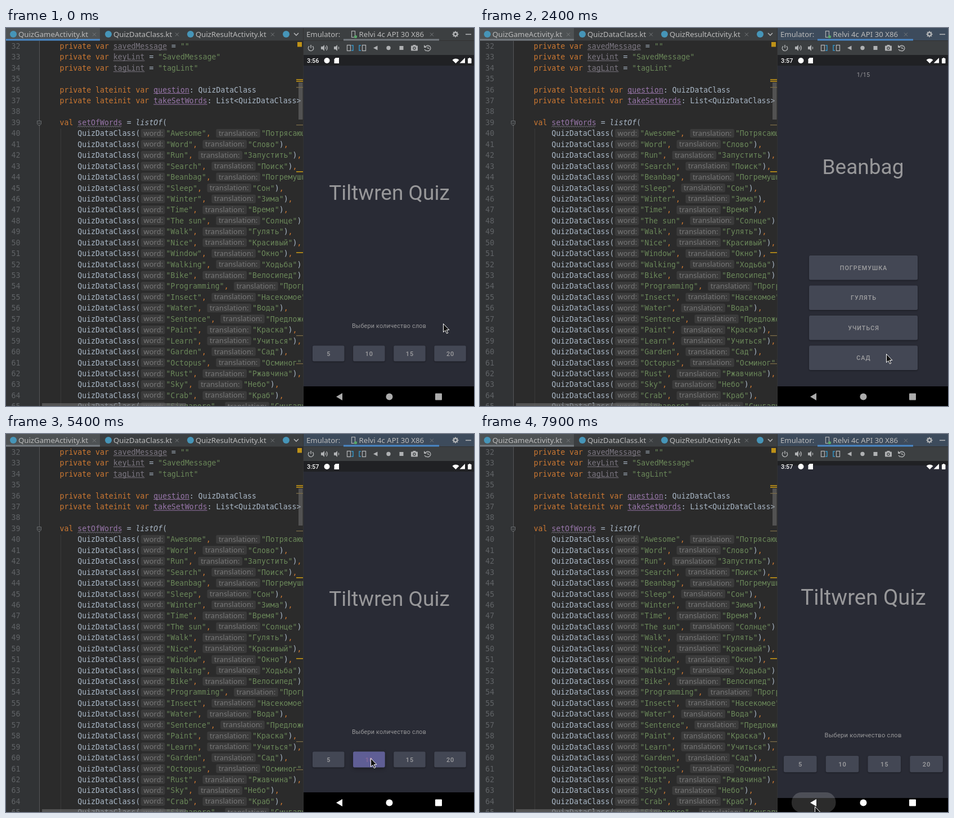
Animation of 832 by 673 pixels, one loop 8000 ms. Source, as an HTML page with a canvas:

```html
<!DOCTYPE html>
<html lang="en">
<head>
<meta charset="utf-8">
<title>Quiz demo</title>
<style>
html, body { margin: 0; width: 100%; height: 100%; overflow: hidden; background: #2b2b2b; }
canvas { display: block; width: 832px; height: 673px; }
</style>
</head>
<body>
<canvas id="stage" width="832" height="673"></canvas>
<script>
const W = 832, H = 673, LOOP = 8000, STEP = 100;
const PHONE = { x: 529, y: 48, cx: 681, cy: 360.5 };
const MONO = '13.2px "DejaVu Sans Mono", monospace';
const UI = '13.2px "Noto Sans", sans-serif';
const HINT = '13px "Noto Sans", sans-serif';
const ROBOTO = 'Roboto, sans-serif';
const CHAR = 7.945, LINE = 19.44, CODE_X = 95.5;
const INK = { text: '#a9b7c6', key: '#cc7832', str: '#6a8759', prop: '#9876aa', unused: '#7c7782' };

const words = ('Awesome=Потрясающе|Word=Слово|Run=Запустить|Search=Поиск|Beanbag=Погремушка|Sleep=Сон|' +
  'Winter=Зима|Time=Время|The sun=Солнце|Walk=Гулять|Nice=Красивый|Window=Окно|Walking=Ходьба|' +
  'Bike=Велосипед|Programming=Программирование|Insect=Насекомое|Water=Вода|Sentence=Предложение|' +
  'Paint=Краска|Learn=Учиться|Garden=Сад|Octopus=Осминог|Rust=Ржавчина|Sky=Небо|Crab=Краб|' +
  'Singapore=Сингапур').split('|').map(pair => pair.split('='));

const games = {
  fifteen: { count: '1/15', word: 'Beanbag', answers: ['ПОГРЕМУШКА', 'ГУЛЯТЬ', 'УЧИТЬСЯ', 'САД'] },
  ten: { count: '1/10', word: 'Car', answers: ['МАШИНА', 'ВРЕМЯ', 'НЕБО', 'ПРЕДЛОЖЕНИЕ'] }
};
const transitions = [
  { at: 2080, kind: 'open', from: 'home', to: 'fifteen' },
  { at: 4480, kind: 'close', from: 'fifteen', to: 'home' },
  { at: 6080, kind: 'open', from: 'home', to: 'ten' },
  { at: 7815, kind: 'close', from: 'ten', to: 'home' }
];
const presses = [{ button: 2, from: 1300, to: 1900 }, { button: 1, from: 5300, to: 5900, fade: 100 }];
const pointer = [
  [0, 777, 526], [500, 777, 526], [1000, 722, 580], [3300, 722, 580], [3700, 592, 649],
  [4600, 592, 649], [5000, 643, 583], [5100, 648, 577], [6400, 648, 577], [6900, 625, 616],
  [7100, 612, 640], [7200, 612, 640], [7600, 595, 663], [8000, 595, 663]
];

const ctx = document.getElementById('stage').getContext('2d');
const clamp = v => Math.max(0, Math.min(1, v));
const mix = (a, b, p) => a + (b - a) * p;

function rect(x, y, w, h, color, r = 0) {
  ctx.fillStyle = color;
  ctx.beginPath();
  ctx.roundRect(x, y, w, h, r);
  ctx.fill();
}
function circle(x, y, r, color) {
  ctx.fillStyle = color;
  ctx.beginPath();
  ctx.arc(x, y, r, 0, Math.PI * 2);
  ctx.fill();
}
function trace(points, close) {
  ctx.beginPath();
  points.forEach(([x, y]) => ctx.lineTo(x, y));
  if (close) ctx.closePath();
}
function poly(points, color) {
  trace(points, true);
  ctx.fillStyle = color;
  ctx.fill();
}
function line(points, color, width = 1) {
  trace(points);
  ctx.strokeStyle = color;
  ctx.lineWidth = width;
  ctx.stroke();
}
function arc(x, y, r, from, to, color, width = 1.3) {
  ctx.beginPath();
  ctx.arc(x, y, r, from, to);
  ctx.strokeStyle = color;
  ctx.lineWidth = width;
  ctx.stroke();
}
function text(s, x, y, font, color, align = 'left', spacing = 0) {
  ctx.font = font;
  ctx.fillStyle = color;
  ctx.textAlign = align;
  ctx.letterSpacing = spacing + 'px';
  ctx.fillText(s, x, y);
  ctx.letterSpacing = '0px';
}
function cross(x, y) {
  line([[x - 3, y - 3], [x + 3, y + 3]], '#777a7c');
  line([[x - 3, y + 3], [x + 3, y - 3]], '#777a7c');
}

// Editor

function codeRun(parts, x, y) {
  for (const [s, color, style] of parts) {
    const end = x + s.length * CHAR;
    text(s, x, y, (style === 'italic' ? 'italic ' : '') + MONO, INK[color]);
    if (style === 'under') rect(x, y + 1.5, end - x, 1, INK[color]);
    if (style === 'wave') {
      const wave = [];
      for (let i = 0; x + i * 2 <= end; i++) wave.push([x + i * 2, y + (i % 2 ? 1.5 : 3.5)]);
      line(wave, '#8b8496', 0.9);
    }
    x = end;
  }
  return x;
}
function hint(label, x, y, advance) {
  rect(x + 1.5, y - 12.5, advance - 3.5, 15.5, '#3b3b3b', 3);
  text(label, x + 6, y - 0.5, HINT, '#787878');
  return x + advance;
}
function drawCode() {
  const baseline = n => 36.8 + (n - 32) * LINE;
  const declare = (n, keyword, name, color, rest) =>
    codeRun([[keyword + ' ', 'key'], [name, color, 'under'], ...rest], CODE_X, baseline(n));

  rect(0, 23, 529, 650, '#2b2b2b');
  rect(0, 23, 59, 650, '#313335');
  rect(59, 23, 1, 650, '#555759');
  rect(97, 179, 1, 494, '#3a3a3a');
  for (let n = 32; n <= 65; n++) text(n, 9.5, baseline(n), MONO, '#606366');

  declare(32, 'private var', 'savedMessage', 'unused', [[' = ', 'text'], ['""', 'str']]);
  declare(33, 'private var', 'keyLint', 'unused', [[' = ', 'text'], ['"SavedMessage"', 'str']]);
  declare(34, 'private var', 'tagLint', 'unused', [[' = ', 'text'], ['"tagLint"', 'str']]);
  declare(36, 'private lateinit var', 'question', 'prop', [[': QuizDataClass', 'text']]);
  declare(37, 'private lateinit var', 'takeSetWords', 'prop', [[': List<QuizDataClass>', 'text']]);
  codeRun([['val ', 'key'], ['setOfWords', 'prop', 'wave'], [' = ', 'text'],
    ['listOf', 'text', 'italic'], ['(', 'text']], CODE_X, baseline(39));

  words.forEach(([word, translation], i) => {
    const y = baseline(40 + i);
    let x = codeRun([['QuizDataClass(', 'text']], CODE_X + 4 * CHAR, y);
    x = hint('word:', x, y, 46);
    x = codeRun([[`"${word}"`, 'str'], [', ', 'key']], x, y);
    x = hint('translation:', x, y, 82);
    codeRun([[`"${translation}"`, 'str'], [')', 'text'], [',', 'key']], x, y);
  });

  rect(55, 165, 8, 7, '#313335');
  line([[55.5, 165.5], [62.5, 165.5], [62.5, 171], [59, 174], [55.5, 171], [55.5, 165.5]], '#6b6e70');
  line([[57, 169.5], [61, 169.5]], '#6b6e70');

  rect(520, 97, 7.5, 66, 'rgba(130,130,130,.45)');
  rect(518, 25, 8, 8.5, '#be9117');
  for (const y of [91, 94, 255, 399]) rect(516, y, 12, 1.7, '#be9117');
  for (const y of [105, 172, 547, 597]) rect(516, y, 12, 1.3, '#7b6b48');
  rect(64, 668, 256, 5, 'rgba(110,110,110,.6)');
}
function underline(x, w, focused) {
  rect(x, 19.5, w, 3, focused ? '#4a88c7' : '#747a80');
}
function drawTabs(focused) {
  rect(0, 0, 529, 23, '#3c3f41');
  rect(0, 22, 529, 1, '#323232');
  rect(0, 0, 167, 22, '#4e5254');
  underline(0, 167, focused);
  const tabs = [[13, 'QuizGameActivity.kt', 157], [182, 'QuizDataClass.kt', 304], [328, 'QuizResultActivity.kt', 474]];
  for (const [x, name, closeX] of tabs) {
    circle(x, 11, 6, '#4695b8');
    text(name, x + 9, 16, UI, '#bbbbbb');
    cross(closeX, 11.5);
  }
  circle(498, 11, 6, '#4695b8');
  line([[512, 9], [516, 13], [520, 9]], '#afb1b3', 1.6);
}

// Emulator panel

function speaker(x, waves) {
  poly([[x - 6, 33], [x - 3, 33], [x, 30], [x, 41], [x - 3, 38], [x - 6, 38]], '#afb1b3');
  for (let i = 1; i <= waves; i++) arc(x, 35.5, i * 2.7, -0.9, 0.9, '#afb1b3');
}
function rotateIcon(x, side) {
  ctx.strokeStyle = '#afb1b3';
  ctx.lineWidth = 1.3;
  ctx.strokeRect(x - 2.5 - side * 2, 30.5, 6, 10);
  line([[x + side * 3, 31], [x + side * 6, 31], [x + side * 6, 40], [x + side * 3, 40]], '#3592c4', 1.5);
}
function drawPanel(focused) {
  rect(528, 0, 1, H, '#323232');
  rect(529, 0, 303, 22, focused ? '#3d4b5c' : '#3c3f41');
  rect(529, 22, 303, 1, '#323232');
  underline(600, 170, focused);
  text('Emulator:', 534, 16, UI, '#bbbbbb');
  ctx.strokeStyle = '#afb1b3';
  ctx.lineWidth = 1.2;
  ctx.strokeRect(614.5, 5.5, 6, 11);
  circle(621.5, 15.5, 2.6, '#59a869');
  text('Relvi 4c API 30 X86', 627.5, 16, UI, '#bbbbbb');
  cross(757, 11.5);
  arc(799, 11, 3.2, 0, 7, '#afb1b3', 2.4);
  for (let i = 0; i < 8; i++) {
    const c = Math.cos(i * Math.PI / 4), s = Math.sin(i * Math.PI / 4);
    line([[799 + c * 3.5, 11 + s * 3.5], [799 + c * 5.6, 11 + s * 5.6]], '#afb1b3', 1.8);
  }
  rect(817, 10.5, 10, 1.6, '#afb1b3');

  rect(529, 23, 303, 25, '#3c3f41');
  arc(542, 36, 4.6, -0.9, Math.PI + 0.9, '#afb1b3', 1.5);
  rect(541.3, 30, 1.5, 5.5, '#afb1b3');
  speaker(566, 2);
  speaker(589, 1);
  rotateIcon(611, 1);
  rotateIcon(634, -1);
  poly([[653, 35.5], [660.5, 31.5], [660.5, 39.5]], '#afb1b3');
  circle(680, 35.5, 3.7, '#afb1b3');
  rect(699.5, 32, 7, 7, '#afb1b3');
  rect(720, 31.5, 12, 9, '#afb1b3', 1);
  rect(723.5, 30, 5, 2, '#afb1b3');
  circle(726, 36, 2.7, '#3c3f41');
  circle(726, 36, 1.5, '#afb1b3');
  arc(750, 36, 4.8, -2.6, 2.2, '#afb1b3', 1.5);
  poly([[743, 30], [743, 35], [748, 35]], '#afb1b3');
  line([[750, 33], [750, 36.5], [753, 36.5]], '#afb1b3', 1.2);
  line([[744, 38], [747, 41]], '#afb1b3', 1.3);
}

// Phone

const homeButtonX = i => 545 + i * 72.1;

function button(x, y, w, h, label, pressed = 0) {
  ctx.save();
  ctx.shadowColor = 'rgba(0,0,0,.4)';
  ctx.shadowBlur = 2.5 + pressed * 4;
  ctx.shadowOffsetY = 1 + pressed;
  rect(x, y, w, h, '#434754', 2.5);
  ctx.restore();
  if (pressed) {
    ctx.save();
    ctx.globalAlpha *= pressed;
    rect(x, y, w, h, '#5f5e95', 2.5);
    ctx.restore();
  }
  text(label, x + w / 2 + 0.5, y + h / 2 + 4, `500 10.8px ${ROBOTO}`, pressed ? '#8c6b9b' : '#a0a0a2', 'center', 0.96);
}
function pressLevel(i, t) {
  const press = presses.find(p => p.button === i && t >= p.from && t < p.to);
  if (!press) return 0;
  return t === press.from || (press.fade && t >= press.to - press.fade) ? 0.5 : 1;
}
function drawApp(name, t, scale = 1, alpha = 1) {
  const game = games[name];
  ctx.save();
  ctx.globalAlpha = alpha;
  ctx.translate(PHONE.cx, PHONE.cy);
  ctx.scale(scale, scale);
  ctx.translate(-PHONE.cx, -PHONE.cy);
  rect(529, 67, 303, 571, '#292b35');
  rect(529, 48, 303, 19, '#202124');
  rect(529, 638, 303, 35, '#000');
  const small = `10.8px ${ROBOTO}`, big = `37px ${ROBOTO}`, gray = '#98989a';
  if (game) {
    text(game.count, 681.5, 87, small, gray, 'center', 0.2);
    text(game.word, 681, 260, big, gray, 'center');
    game.answers.forEach((label, i) => button(585, 405 + i * 53.5, 193, 43.5, label));
  } else {
    text('Tiltwren Quiz', 681.5, 306, big, gray, 'center');
    text('Выбери количество слов', 681, 534, small, gray, 'center', 0.2);
    [5, 10, 15, 20].forEach((n, i) => button(homeButtonX(i), 565.5, 56.5, 28, n, pressLevel(i, t)));
  }
  ctx.restore();
}
// Quick start with a very slow settle.
function settle(p) {
  if (p < 1 / 6) return 0.4 * Math.pow(p * 6, 2.5);
  const v = 1 - 0.6 * Math.exp(-10.5 * (p - 1 / 6));
  return v > 0.99 ? 1 : v;
}
function drawScreens(t) {
  const move = transitions.filter(m => t >= m.at).pop();
  if (!move) return drawApp('home', t);
  const age = t - move.at, p = settle(age / 400);
  if (p === 1) return drawApp(move.to, t);
  if (move.kind === 'open') {
    drawApp(move.from, t, mix(1, 1.05, p));
    drawApp(move.to, t, mix(0.85, 1, p), clamp(age / 50));
  } else {
    const left = 1 - clamp((age - 35) / 50);
    drawApp(move.to, t, mix(1.1, 1, p));
    if (left > 0) drawApp(move.from, t, mix(1, 0.9, p), left);
  }
}
function drawStatus(t) {
  text(t < 600 ? '3:56' : '3:57', 535, 62, `500 10.9px ${ROBOTO}`, '#fff');
  circle(570.5, 58, 5, '#fff');
  poly([[586, 53], [592, 53], [592, 63], [583.5, 63], [583.5, 55.5]], '#fff');
  ctx.fillStyle = '#fff';
  ctx.beginPath();
  ctx.moveTo(799.5, 63);
  ctx.arc(799.5, 63, 8.5, -Math.PI * 0.75, -Math.PI * 0.25);
  ctx.fill();
  poly([[806.5, 62.5], [816, 62.5], [816, 53]], '#fff');
  rect(821, 54, 6.5, 9, '#fff', 0.8);
  rect(823, 53, 2.5, 2, '#fff');
}
function drawNav(t) {
  const ripple = t >= 7700 ? (t < 7800 ? 0.5 : 1)
    : t < 4200 ? 0 : t < 4300 ? 0.5 : 1 - clamp((t - 4400) / 300);
  if (ripple) rect(554, 638, 78.5, 36, `rgba(255,255,255,${0.17 * ripple})`, 17.5);
  const lit = t >= 7700 ? 1 : t < 4200 ? 0 : 1 - clamp((t - 6700) / 400);
  const v = Math.round(mix(172, 255, lit)), color = `rgb(${v},${v},${v})`;
  poly([[587, 656.5], [598, 650], [598, 663]], color);
  circle(681.5, 656.5, 6, color);
  rect(763, 650.5, 12, 12, color, 1);
}
function drawPointer(t) {
  const i = pointer.findIndex(k => k[0] > t);
  const [t0, x0, y0] = pointer[i - 1], [t1, x1, y1] = pointer[i];
  const p = (t - t0) / (t1 - t0);
  ctx.save();
  ctx.translate(mix(x0, x1, p) + 0.5, mix(y0, y1, p) + 0.5);
  trace([[0, 0], [0, 15], [3.4, 11.9], [6, 17.4], [8.3, 16.4], [5.8, 11], [10.4, 11]], true);
  ctx.fillStyle = '#111';
  ctx.fill();
  ctx.strokeStyle = '#fff';
  ctx.lineWidth = 1;
  ctx.stroke();
  ctx.restore();
}

function draw(t) {
  const phoneFocused = t >= 1300;
  drawCode();
  drawTabs(!phoneFocused);
  drawPanel(phoneFocused);
  ctx.save();
  ctx.beginPath();
  ctx.rect(PHONE.x, PHONE.y, W - PHONE.x, H - PHONE.y);
  ctx.clip();
  rect(PHONE.x, PHONE.y, W - PHONE.x, H - PHONE.y, '#000');
  drawScreens(t);
  drawStatus(t);
  drawNav(t);
  drawPointer(t);
  ctx.restore();
}

const start = performance.now();
function tick() {
  const t = (performance.now() - start) % LOOP;
  draw(Math.floor(t / STEP) * STEP);
  requestAnimationFrame(tick);
}
tick();
</script>
</body>
</html>
```
